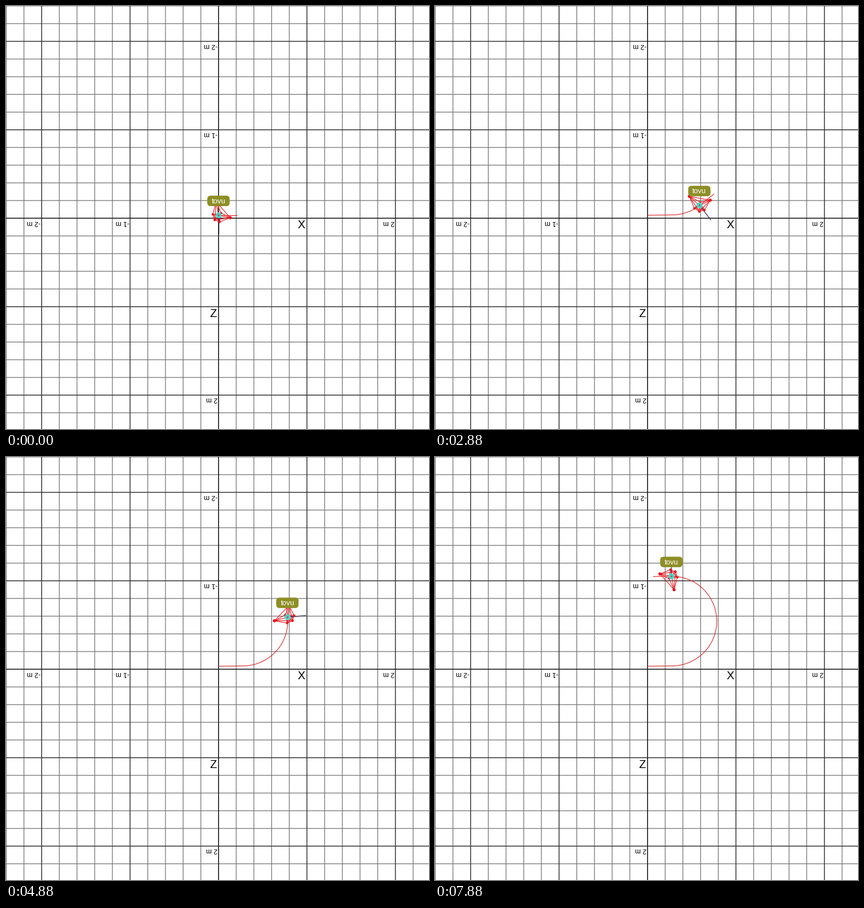
Write a matplotlib script that moves like this. It is 748x748 px and loops after 8 s.

```python
from itertools import combinations

import numpy as np
import matplotlib.pyplot as plt
from matplotlib.animation import FuncAnimation
from matplotlib.collections import LineCollection
from matplotlib.patches import Circle, FancyBboxPatch

SIZE, DPI = 748, 100
FRAMES, STEP_MS = 64, 125
PX = 72 / DPI                      # points per pixel
CX, CY, CELL = 375.8, 375.3, 31.28
START = np.array([376.0, 370.0])
ARC_C, ARC_R = np.array([419.0, 290.2]), 79.2
STRAIGHT = 43.0
SPEED, T_ON, T_FULL = 39.4, 0.2, 0.7
AXIS_LEN = 32
RED, NAVY, CYAN, OLIVE = "#e8161e", "#3c2c58", "#48d6cc", "#8e8e26"

# Body nodes as (forward, right, dot radius)
NODES = np.array([
    (20.5, 4.4, 2.8), (-4.3, -23.7, 2.8), (-10.3, -1.6, 2.1),
    (-6.9, 8.2, 2.3), (1.8, 11.8, 2.1), (4.5, -3.8, 1.8),
])
EDGES = list(combinations(range(len(NODES)), 2))

fig = plt.figure(figsize=(SIZE / DPI, SIZE / DPI), dpi=DPI, facecolor="white")
ax = fig.add_axes([0, 0, 1, 1])
ax.set_xlim(0, SIZE)
ax.set_ylim(SIZE, 0)
ax.axis("off")


def text(x, y, s, size, **kw):
    kw = {"ha": "center", "va": "center", "color": "black", **kw}
    return ax.text(x, y, s, fontsize=size * PX, family="Liberation Sans", **kw)


def draw_grid():
    for k in range(-12, 13):
        if k == 0:
            color, width, z = "#141414", 1.6, 3
        elif k % 5 == 0:
            color, width, z = "#303030", 1.5, 2
        else:
            color, width, z = "#767676", 1.3, 1
        x, y = CX + k * CELL, CY + k * CELL
        style = dict(color=color, lw=width * PX, zorder=z, snap=False)
        ax.plot([x, x], [0, SIZE], **style)
        ax.plot([0, SIZE], [y, y], **style)
    for m in (-2, -1, 2):
        off = m * 5 * CELL
        style = dict(rotation=180, ha="right", zorder=4)
        text(CX + off - 1.5, CY + 8, f"{m} m", 12, **style)
        text(CX - 1.8, CY + off + 7.2, f"{m} m", 12, **style)
    text(522.5, 387.8, "X", 20, zorder=4)
    text(367, 544, "Z", 20, zorder=4)


def distance(t):
    """Arc length travelled, with a short ramp up to cruise speed."""
    if t <= T_ON:
        return 0.0
    ramp = T_FULL - T_ON
    if t < T_FULL:
        return SPEED * (t - T_ON) ** 2 / (2 * ramp)
    return SPEED * (t - T_FULL + ramp / 2)


def pose(s):
    """Position and left turn (radians) after travelling s."""
    if s < STRAIGHT:
        k = s / STRAIGHT
        return START + [s, -0.6 * k], np.radians(2)* k
    a = (s - STRAIGHT) / ARC_R
    return ARC_C + ARC_R * np.array([np.sin(a), np.cos(a)]), max(a, np.radians(2))


draw_grid()
trail, = ax.plot([], [], color="#dc2020", lw=1.1 * PX, zorder=5)
body = LineCollection([], colors=RED, linewidths=1.1 * PX, zorder=6)
ax.add_collection(body)
right_axis, = ax.plot([], [], color=NAVY, lw=1.3 * PX, zorder=7)
front_axis, = ax.plot([], [], color=RED, lw=1.1 * PX, zorder=7)
dots = [ax.add_patch(Circle((0, 0), r, color=RED, lw=0, zorder=8))
        for r in NODES[:, 2]]
hub = ax.add_patch(Circle((0, 0), 5.2, color=CYAN, lw=0, zorder=9))
core = ax.add_patch(Circle((0, 0), 1.5, color="#c8483c", lw=0, zorder=10))
tag = ax.add_patch(FancyBboxPatch((0, 0), 39.5, 18.5, zorder=11, fc=OLIVE, lw=0,
                                  boxstyle="round,pad=0,rounding_size=6"))
name = text(0, 0, "tovu", 13, color="white", zorder=12, va="baseline")


def update(i):
    s = distance(i * STEP_MS / 1000)
    pos, turn = pose(s)
    fwd = np.array([np.cos(turn), -np.sin(turn)])
    right = np.array([np.sin(turn), np.cos(turn)])

    path = np.array([pose(d)[0] for d in np.linspace(0, s, 120)])
    trail.set_data(path[:, 0], path[:, 1])

    pts = pos + NODES[:, :1] * fwd + NODES[:, 1:2] * right
    body.set_segments([pts[[a, b]] for a, b in EDGES])
    for dot, p in zip(dots, pts):
        dot.center = tuple(p)
    for line, d in ((front_axis, fwd), (right_axis, right)):
        line.set_data(*zip(pos, pos + AXIS_LEN * d))
    hub.center = core.center = tuple(pos)

    x, y = pos + [-0.3, -25.4]
    tag.set_x(x - 19.75)
    tag.set_y(y - 9.25)
    name.set_position((x, y + 4))
    return trail, body, right_axis, front_axis, *dots, hub, core, tag, name


anim = FuncAnimation(fig, update, frames=FRAMES, interval=STEP_MS,
                     repeat=True, repeat_delay=0, blit=False)
plt.show()
```
